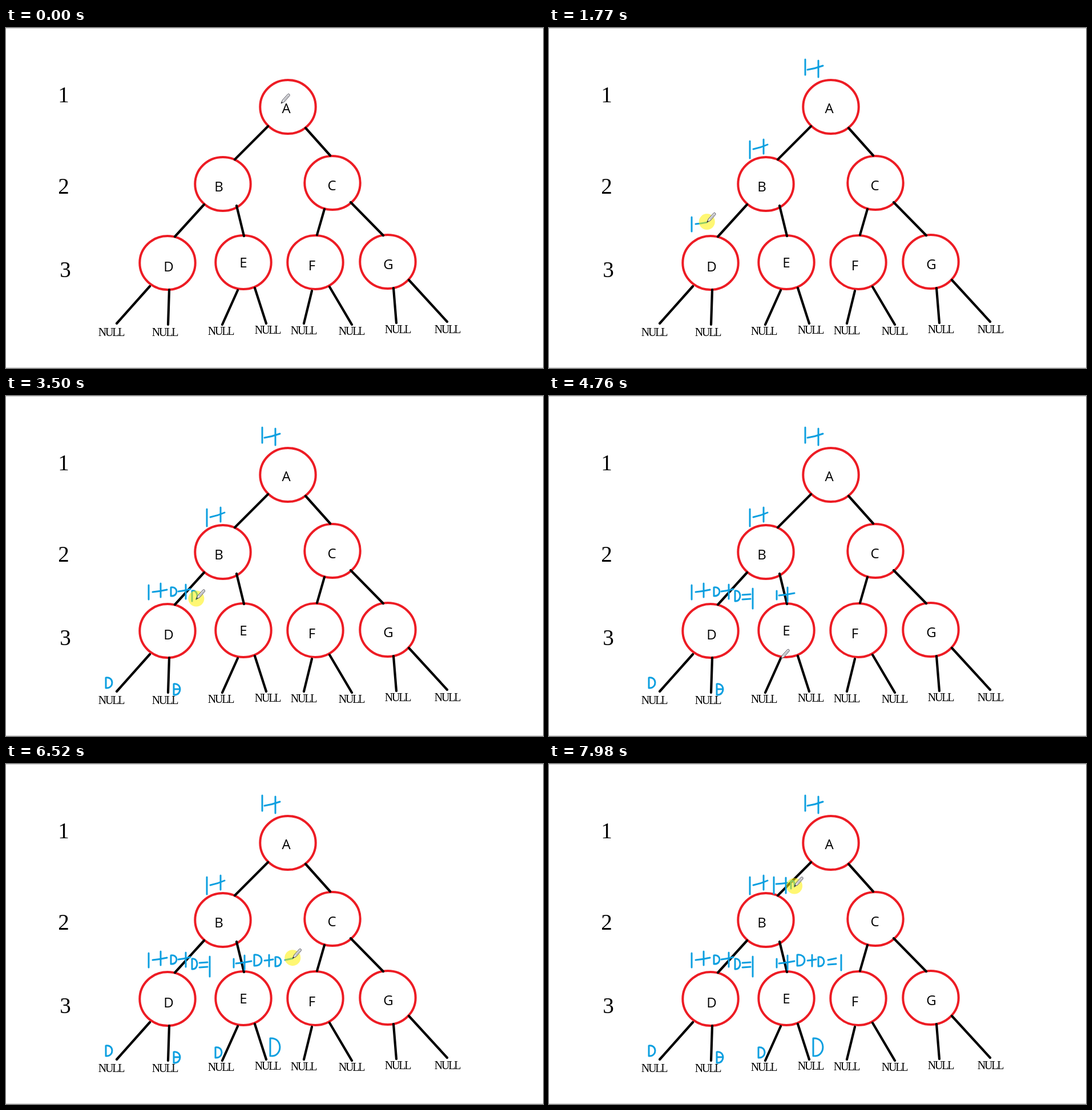
An HTML page for the animation above (8000 ms loop, 941 by 595 pixels).

```html
<!DOCTYPE html>
<html lang="en">
<head>
<meta charset="utf-8">
<title>Counting tree depth</title>
<style>
  html, body { margin: 0; width: 100%; height: 100%; overflow: hidden; background: #fff; }
  svg { display: block; width: 941px; height: 595px; }
  text { text-anchor: middle; }
  .frame { stroke: #c8c8c8; }
  .node { fill: none; stroke: #ed1c24; stroke-width: 4; }
  .edge { fill: none; stroke: #000; stroke-width: 4.2; stroke-linecap: round; }
  .ink path { fill: none; stroke: #0c9fe0; stroke-width: 3; stroke-linecap: round; stroke-linejoin: round; }
  .name { font: 24px "Open Sans", "Noto Sans", sans-serif; }
  .level { font: 39px "Liberation Serif", serif; }
  .leaf { font: 20px "Liberation Serif", serif; letter-spacing: -2.2px; }
</style>
</head>
<body>
<svg viewBox="0 0 941 595">
  <path class="frame" d="M0 .5H941M0 594.5H941"/>
  <g id="tree"></g>
  <path class="edge" d="M459 172L401 230M525 175L568 223M347 309L296 365M404 311L417 364M558 317L545 362M604 305L661 363"/>
  <path class="edge" d="M252 452L194 517M286 458L284 519M406 459L379 519M436 455L456 517M536 460L522 517M567 453L606 519M679 455L684 516M706 441L773 514"/>
  <g class="ink" id="ink"></g>
  <g id="pen">
    <circle id="glow" cy="-1" r="14" fill="#fff000" opacity=".55"/>
    <path d="M0 0L2.5 -6L12 -16.5Q15.5 -17.5 15 -13.5L6 -3Z" fill="#e6e6e8" stroke="#4c4c58"/>
    <path d="M5 -5L13 -14" stroke="#8c8c96" fill="none"/>
    <path d="M0 0L1 -3L3 -1.5Z" fill="#222"/>
  </g>
</svg>
<script>
const LOOP = 8000;
const $ = id => document.getElementById(id);
const tree = $('tree'), ink = $('ink'), pen = $('pen'), glow = $('glow');

function add(parent, tag, attrs, text = '') {
  const el = document.createElementNS('http://www.w3.org/2000/svg', tag);
  for (const key in attrs) el.setAttribute(key, attrs[key]);
  el.textContent = text;
  return parent.appendChild(el);
}
const label = (kind, text, x, y) => add(tree, 'text', { class: kind, x, y }, text);

function node(name, cx, cy, x, y) {
  add(tree, 'ellipse', { class: 'node', cx, cy, rx: 48.7, ry: 47 });
  label('name', name, x, y);
}
node('A', 494, 138, 491, 149);
node('B', 380, 273, 373, 286);
node('C', 572, 271, 571, 284);
node('D', 283, 411, 285, 426);
node('E', 416, 410, 416, 419);
node('F', 542, 410, 536, 424);
node('G', 669, 409, 670, 422);
[[101, 130], [101, 290], [104, 436]].forEach(([x, y], i) => label('level', i + 1, x, y));
[[185, 539], [279, 539], [377, 537], [459, 535], [522, 536], [606, 537], [687, 534], [774, 534]]
  .forEach(([x, y]) => label('leaf', 'NULL', x - 1, y));

// Each step is either an inked stroke or a point the pen passes through.
const steps = [];
function stroke(start, duration, d) {
  const path = add(ink, 'path', { d });
  const length = path.getTotalLength();
  steps.push({
    start, end: start + duration, path, length, pressed: true,
    from: path.getPointAtLength(0), to: path.getPointAtLength(length)
  });
}
function pass(start, x, y, hold = 0, pressed = false) {
  const point = { x, y };
  steps.push({ start, end: start + hold, from: point, to: point, pressed });
}
const one = (t, x, y, h) => stroke(t, 100, `M${x} ${y}v${h}`);
function plus(t, x, y, w, rise, barX, top, h) {
  stroke(t, 90, `M${x} ${y}q${w * .5} ${-rise * .3} ${w} ${-rise}`);
  stroke(t + 150, 75, `M${barX} ${top}v${h}`);
}
function zero(t, duration, x, y, w, h) {
  stroke(t, duration, `M${x} ${y + h}V${y}C${x + w * 1.3} ${y - 2} ${x + w * 1.3} ${y + h} ${x + w * .15} ${y + h}`);
}
function equals(t, x, y, rise) {
  stroke(t, 75, `M${x} ${y}l14 ${-rise}`);
  stroke(t + 145, 65, `M${x} ${y + 8}l14 -1`);
}

pass(0, 482, 132, 50);
one(200, 449, 55, 27);
plus(440, 453, 73, 27, 7, 472, 57, 29);
pass(840, 435, 171);
one(980, 352, 198, 30);
plus(1160, 358, 212, 25, 8, 376, 195, 25);
one(1520, 250, 331, 25);
plus(1700, 257, 343, 25, 4, 271, 328, 24);
zero(2090, 200, 175, 493, 11, 18);
pass(2435, 297, 520, 35, true);
zero(2520, 160, 294, 504, 11, 19);
stroke(2710, 40, 'M295 513h9');
zero(2870, 150, 289, 335, 10, 15);
plus(3130, 302, 342, 21, 4, 315, 330, 25);
zero(3400, 120, 326, 341, 9, 18);
equals(3600, 339, 348, 1);
one(3870, 357, 337, 35);
pass(4080, 392, 342);
one(4130, 399, 341, 15);
plus(4290, 403, 349, 27, 4, 418, 335, 25);
pass(4760, 406, 460);
zero(4930, 210, 367, 496, 11, 18);
zero(5290, 220, 463, 480, 17, 31);
zero(5740, 180, 435, 334, 13, 19);
plus(6000, 453, 344, 15, 2, 461, 334, 20);
zero(6260, 120, 472, 338, 10, 16);
equals(6450, 489, 343, 3);
one(6750, 512, 334, 27);
one(7130, 394, 198, 29);
plus(7390, 398, 210, 20, 2, 415, 199, 27);
stroke(7770, 215, 'M424 218V205Q431 202 430 215');

const clamp = v => Math.max(0, Math.min(1, v));
const ease = v => v * v * (3 - 2 * v);

function penAt(t) {
  const index = steps.findIndex(s => t < s.end);
  if (index < 0) return { point: steps.at(-1).to, pressed: true };
  const step = steps[index];
  if (t >= step.start) {
    const point = step.path
      ? step.path.getPointAtLength(step.length * (t - step.start) / (step.end - step.start))
      : step.to;
    return { point, pressed: step.pressed };
  }
  const last = steps[index - 1];
  const k = ease((t - last.end) / (step.start - last.end));
  return {
    point: {
      x: last.to.x + (step.from.x - last.to.x) * k,
      y: last.to.y + (step.from.y - last.to.y) * k
    },
    pressed: false
  };
}

function draw(now) {
  const t = now % LOOP;
  for (const { path, length, start, end } of steps) {
    if (!path) continue;
    const k = clamp((t - start) / (end - start));
    path.style.visibility = k > 0 ? 'visible' : 'hidden';
    path.style.strokeDasharray = k < 1 ? `${length * k} ${length + 9}` : 'none';
  }
  const { point, pressed } = penAt(t);
  pen.setAttribute('transform', `translate(${point.x} ${point.y})`);
  glow.style.visibility = pressed ? 'visible' : 'hidden';
  requestAnimationFrame(draw);
}
draw(0);
</script>
</body>
</html>
```
